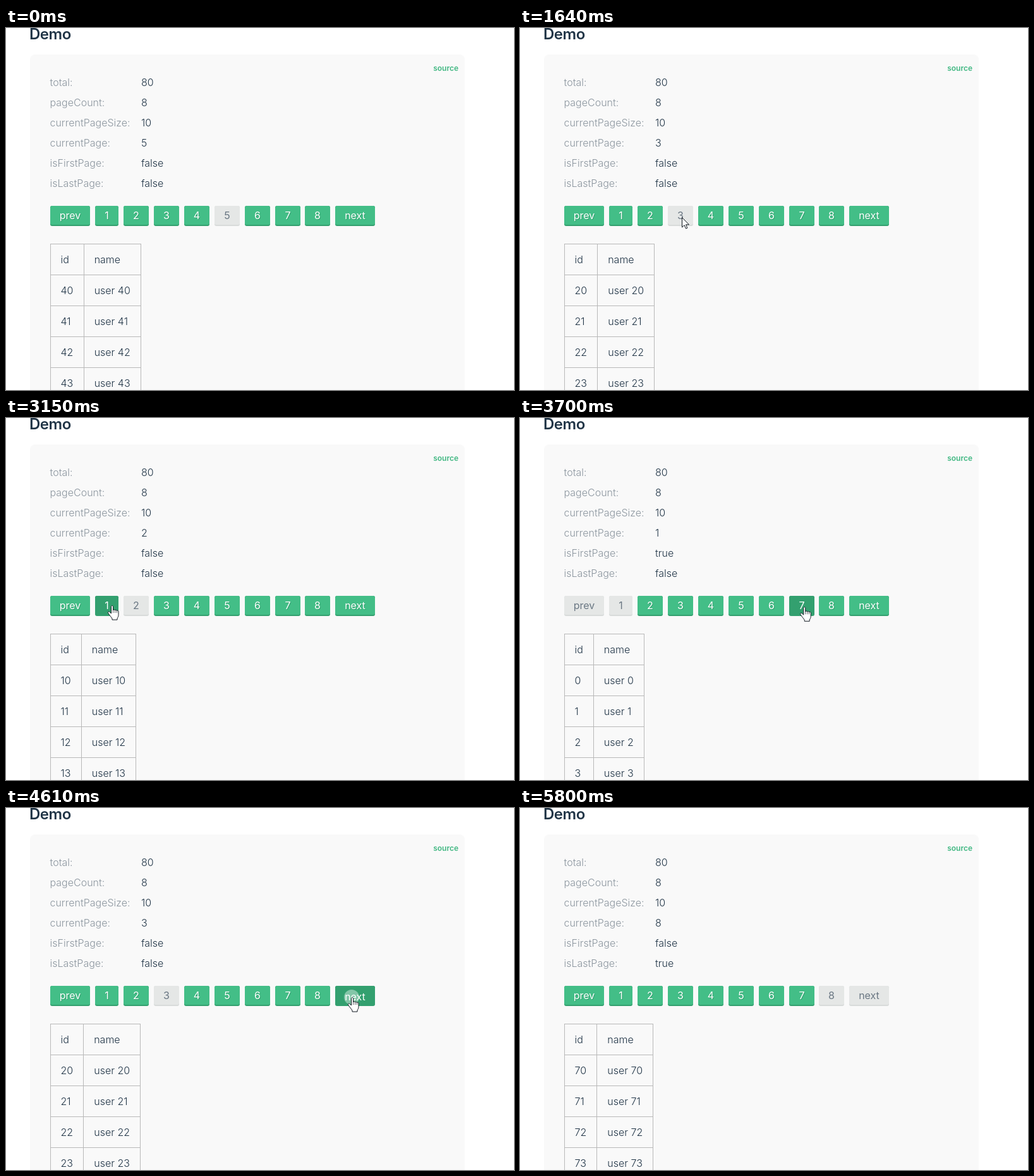
Write an HTML page that moves like this. It is 804 by 574 pixels and loops after 6200 ms.

```html
<!DOCTYPE html>
<html lang="en">
<head>
<meta charset="utf-8">
<title>Pagination demo</title>
<style>
  html, body { margin: 0; width: 100%; height: 100%; overflow: hidden; background: #fff; }
  svg { display: block; width: 804px; height: 574px; }
  text { font: 300 16px Inter, sans-serif; fill: #213547; white-space: pre; }
  .title { font-size: 24px; font-weight: 600; letter-spacing: -0.02em; }
  .link { font-size: 12px; font-weight: 600; fill: #42b883; text-anchor: end; }
  .label { opacity: .5; }
  .btn text { font-weight: 400; fill: #fff; text-anchor: middle; filter: drop-shadow(1px 1px .5px #33a06f); }
  .btn .edge { fill: #33a06f; }
  .btn .face { fill: #43be87; }
  .btn.hover .face { fill: #33a06f; }
  .btn.off text { fill: #6a7783; filter: none; }
  .btn.off .edge { fill: #d8dbda; }
  .btn.off .face { fill: #e5e7e6; }
  .rule { fill: #b9b9b9; }
  .cursor path { fill: #fff; stroke: #111820; stroke-linejoin: round; }
</style>
</head>
<body>
<svg id="stage" viewBox="0 0 804 574"></svg>
<script>
const LOOP = 6200, STEP = 70, PHASE = 60, HOLD = 120, FETCH = 100;
const SHOWN = 130, HIDDEN = 5800;
const LEFT = 70, ROW = 49, CELL = 33;
const stage = document.getElementById('stage');

function set(node, attrs) {
  for (const key in attrs) node.setAttribute(key, attrs[key]);
}
function add(parent, tag, attrs, content = '') {
  const node = document.createElementNS('http://www.w3.org/2000/svg', tag);
  set(node, attrs);
  node.textContent = content;
  return parent.appendChild(node);
}
const label = (parent, x, y, str, cls = '') => add(parent, 'text', { x, y, class: cls }, str);
const show = (node, on) => set(node, { visibility: on ? 'visible' : 'hidden' });
const range = (n, fn) => Array.from({ length: n }, (_, i) => fn(i));

// Pointer moves: begin, end, destination
const entry = { x: 742, y: 558 };
const moves = [
  [130, 270, 455, 324],
  [600, 760, 385, 333],
  [760, 970, 270, 315],
  [1110, 1290, 256, 300],
  [1830, 2180, 313, 302],
  [2460, 2800, 208, 299],
  [2950, 3140, 167, 297],
  [3360, 4050, 547, 300],
  [5420, 5730, 715, 555]
];

// Single page picks, then a steady run on "next"
const clicks = [
  { down: 1360, page: 3 }, { down: 2180, page: 4 },
  { down: 2800, page: 2 }, { down: 3220, page: 1 },
  ...range(7, i => ({ down: 4180 + 185 * i, page: i + 2 }))
];

// Static page
label(stage, 37, 18, 'Demo', 'title');
add(stage, 'rect', { x: 38, y: 42, width: 688, height: 560, rx: 8, fill: '#f9f9f9' });
label(stage, 716, 68, 'source', 'link');

const values = ['total:', 'pageCount:', 'currentPageSize:', 'currentPage:', 'isFirstPage:', 'isLastPage:']
  .map((name, i) => {
    label(stage, 69.5, 92 + 32 * i, name, 'label');
    return label(stage, 214, 92 + 32 * i, '');
  });

function makeButton(name, x, width) {
  const g = add(stage, 'g', { class: 'btn' });
  add(g, 'rect', { class: 'edge', x, y: 282, width, height: 32, rx: 3 });
  add(g, 'rect', { class: 'face', x, y: 282, width, height: 30, rx: 3, ry: 2.5 });
  return { g, x, width, text: label(g, x + width / 2, 303, name) };
}
const pageX = n => Math.round(90.6 + 47.85 * n);
const buttons = [
  makeButton('prev', LEFT, 63),
  makeButton('1', 141, 37),
  ...range(7, i => makeButton(i + 2, pageX(i + 2), 40)),
  makeButton('next', pageX(9), 63)
];

// Table, with columns sized by their widest text
const ruler = document.createElement('canvas').getContext('2d');
ruler.font = '300 16px Inter, sans-serif';
const widest = list => Math.max(...list.map(str => ruler.measureText(str).width));

const columns = range(8, page => {
  const ids = range(10, i => String(page * 10 + i));
  const mid = LEFT + CELL + widest(['id', ...ids]);
  return { mid, right: mid + CELL + widest(['name', ...ids.map(id => 'user ' + id)]) };
});

const rule = (x, y, width, height) => add(stage, 'rect', { class: 'rule', x, y, width, height });
const rows = range(5, i => ({
  line: rule(LEFT, 342 + ROW * i, 0, 1),
  id: label(stage, LEFT + 16.5, 373 + ROW * i, 'id'),
  name: label(stage, 0, 373 + ROW * i, 'name')
}));
const [, divider, rightEdge] = range(3, () => rule(LEFT, 342, 1, 232));

// Pointer
const ripple = add(stage, 'circle', { r: 12, fill: '#fff', opacity: .4 });
const arrow = add(stage, 'g', { class: 'cursor' });
add(arrow, 'path', { d: 'M.5.5V16l3.6-3.4 2.5 5.5 2.3-1-2.4-5.3h5z' });
const hand = add(stage, 'g', { class: 'cursor' });
add(hand, 'path', {
  d: 'M5.5 2.2C5.5 0 8.5 0 8.5 2.2V8c0-1.5 3-1.5 3 .3 0-1.4 2.8-1.2 2.8.6 0-1.3 2.7-1 2.7 1v5.6c0 2.5-1.2 3.5-2 5.5v2H7v-2C5.5 18.5 3 16 .8 12.5-.3 10.3 2 9.2 3.7 11l1.8 2z'
});
add(hand, 'path', { d: 'M8.5 8v4M11.5 8.5V12M14.3 9v3', 'stroke-width': .7 });

const snap = t => Math.max(0, Math.floor((t - PHASE) / STEP) * STEP + PHASE);

function pointerAt(t) {
  let { x, y } = entry;
  for (const [begin, end, toX, toY] of moves) {
    const k = Math.min(1, Math.max(0, (t - begin) / (end - begin)));
    const eased = k * (2 - k);
    x += (toX - x) * eased;
    y += (toY - y) * eased;
  }
  return { x, y };
}

const pageAt = t => clicks.reduce((page, c) => c.down + HOLD <= t ? c.page : page, 5);
const pressedFor = (t, delay) => clicks.some(c => t >= c.down + delay && t < c.down + HOLD);

function drawTable(page) {
  const { mid, right } = columns[page - 1];
  set(divider, { x: Math.floor(mid) });
  set(rightEdge, { x: Math.floor(right) });
  rows.forEach((row, i) => {
    set(row.line, { width: Math.floor(right) + 1 - LEFT });
    set(row.name, { x: mid + 16.5 });
    if (i === 0) return;
    const id = (page - 1) * 10 + i - 1;
    row.id.textContent = id;
    row.name.textContent = 'user ' + id;
  });
}

function render(time) {
  const t = snap(time);
  const page = pageAt(t);
  const visible = t >= SHOWN && t < HIDDEN;
  const { x, y } = pointerAt(t);
  const pressed = pressedFor(t, 0);

  [80, 8, 10, page, page === 1, page === 8].forEach((v, i) => values[i].textContent = v);

  let overButton = false;
  buttons.forEach((b, i) => {
    const off = i === page || (i === 0 && page === 1) || (i === 9 && page === 8);
    const hover = visible && !off && x >= b.x && x < b.x + b.width && y >= 282 && y < 314;
    overButton = overButton || hover;
    set(b.g, { class: 'btn' + (off ? ' off' : '') + (hover ? ' hover' : '') });
    set(b.text, { y: hover && pressed ? 305 : 303 });
  });

  drawTable(pageAt(t - FETCH));

  set(ripple, { cx: x, cy: y });
  show(ripple, pressedFor(t, HOLD / 2));
  set(arrow, { transform: `translate(${x} ${y})` });
  set(hand, { transform: `translate(${x - 6} ${y})` });
  show(arrow, visible && !overButton);
  show(hand, visible && overButton);
}

const start = performance.now();
function tick() {
  render((performance.now() - start) % LOOP);
  requestAnimationFrame(tick);
}
tick();
</script>
</body>
</html>
```
